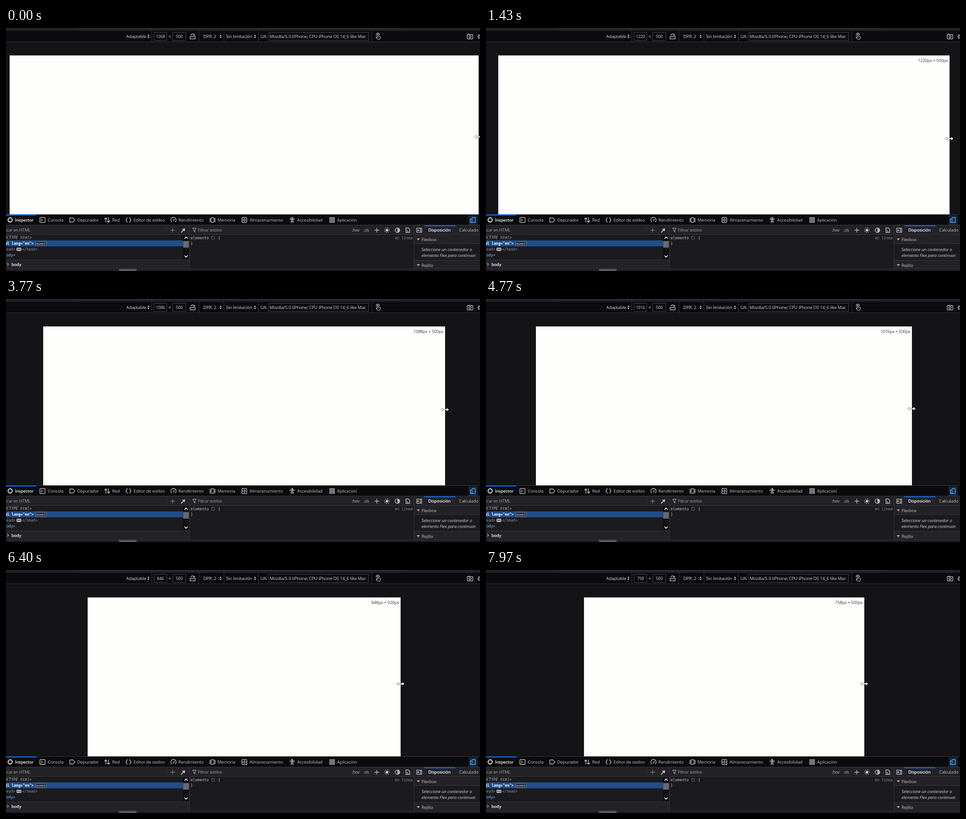
These frames come from a looping animation (1045x536 px, 8 s). An HTML page:

```html
<!DOCTYPE html>
<html lang="es">
<head>
<meta charset="utf-8">
<title>Vista adaptable</title>
<style>
  html, body { margin: 0; width: 100%; height: 100%; overflow: hidden; background: #141416; }
  svg { display: block; width: 1045px; height: 536px; }
  text { font: 9.7px "Open Sans", "Noto Sans", sans-serif; letter-spacing: -.2px; fill: #c0c0c4; white-space: pre; }
  .tool text { fill: #d6d6da; }
  .tabs text { font-weight: 500; }
  text.on { font-size: 9.3px; font-weight: 600; fill: #fff; }
  text.dim { font-size: 9.4px; fill: #a2a2a8; }
  text.it { font-style: italic; fill: #d0d0d4; }
  text.mono { font: 8.3px "DejaVu Sans Mono", "Noto Sans Mono", monospace; letter-spacing: 0; }
  text.bold { font-weight: 700; fill: #fff; }
  text.slant { font-style: italic; fill: #b0b0b5; }
  text.tag { fill: #75bfff; }
  text.gray { fill: #8f8f95; }
  text#label { font-size: 9.4px; letter-spacing: -.18px; fill: #3c3c40; }
  .end { text-anchor: end; }
  .mid { text-anchor: middle; }
  .rule { stroke: #36363c; fill: none; }
  .band { fill: #222227; }
  .box { fill: #0b0b0e; stroke: #45454c; }
  .ic { stroke: #bcbcc0; stroke-width: 1.4; fill: none; }
  .fill { fill: #bcbcc0; stroke: none; }
</style>
</head>
<body>
<svg viewBox="0 0 1045 536">
  <defs>
    <path id="spin" d="M-2.5-1 0-4 2.5-1zM-2.5 1 0 4 2.5 1z" fill="#c8c8cc"/>
    <path id="open" d="M-3.5-2h7L0 2.5z" fill="#a8a8ae"/>
  </defs>

  <!-- viewport -->
  <rect width="1045" height="536" fill="#141416"/>
  <rect id="page" y="60.5" height="351" fill="#fefefd"/>
  <text id="label" class="end" y="74.5"></text>
  <g id="cursor">
    <path d="M-9 0-4.5-3.5V-1H0V1H-4.5V3.5z" fill="#fff" stroke="#77777c" stroke-width=".8"/>
    <path d="M9 0 4.5-3.5V-1H0V1H4.5V3.5z" fill="#fff"/>
  </g>

  <!-- device toolbar -->
  <g class="tool">
    <rect width="1045" height="6" fill="#23222b"/>
    <path d="M154 .5H870" stroke="#3b3a45"/>
    <rect y="6" width="1045" height="24" fill="#0b0b0e"/>
    <path class="rule" d="M0 30.5H1045M321.5 6V30M425.5 6V30M480.5 6V30M556.5 6V30M806.5 6V30"/>
    <rect class="box" x="326.5" y="9.5" width="28" height="18"/>
    <rect class="box" x="367.5" y="9.5" width="29" height="18"/>
    <rect class="box" x="579.5" y="9.5" width="220" height="18"/>
    <text x="265" y="22">Adaptable</text>
    <use href="#spin" x="314" y="18.5"/>
    <text id="field" class="mid" x="340.5" y="22" style="font-size:9.2px"></text>
    <text class="mid" x="361" y="22">×</text>
    <text class="mid" x="382" y="22" style="font-size:9.2px">500</text>
    <g class="ic">
      <rect x="406" y="18.5" width="11" height="5.5"/>
      <path d="M408 16V14.5Q411.5 11.5 414.5 15"/>
      <path class="fill" d="M412.5 16.5H416.5V12.5z"/>
    </g>
    <text x="435" y="22">DPR: 2</text>
    <use href="#spin" x="473" y="18.5"/>
    <text x="485" y="22">Sin limitación</text>
    <use href="#spin" x="549" y="18.5"/>
    <text x="561" y="22">UA:</text>
    <text x="581.5" y="22">Mozilla/5.0 (iPhone; CPU iPhone OS 14_6 like Mac</text>
    <g class="ic" stroke-linejoin="round">
      <path d="M818.5 21V14.5a1.3 1.3 0 0 1 2.6 0V18l4.2 1v2.5q0 3.5-3.5 3.5h-1.5q-1.5 0-4.5-4.5 1-1.3 2.7.5z" stroke-width="1.2"/>
      <path d="M816.5 16.5a3.7 3.7 0 1 1 6.8-.5" stroke-width="1.1"/>
      <rect x="1016.7" y="14.5" width="12.5" height="9.5" rx="1.5"/>
      <circle cx="1023" cy="19.2" r="2.3"/>
      <path d="M1019 13.7H1022"/>
      <circle cx="1045" cy="19" r="3.3"/>
      <path d="M1039 19H1042M1041 14.5 1043 16.5M1041 23.5 1043 21.5"/>
    </g>
  </g>

  <!-- panel tabs -->
  <g class="tabs">
    <rect y="411" width="1045" height="24" fill="#0b0b0e"/>
    <path class="rule" d="M0 411.5H1045M0 434.5H1045"/>
    <rect y="411.3" width="67" height="2.4" fill="#0668ea"/>
    <rect x="1020" y="413" width="20" height="21" fill="#13263c"/>
    <g id="tabs"></g>
    <g class="ic">
      <g stroke="#fff">
        <rect x="5.2" y="419.2" width="8" height="8" rx="1.5"/>
        <path d="M9.2 417V419M9.2 427.5V430M3 423.2H5M13.5 423.2H15.5"/>
      </g>
      <rect x="74.7" y="418" width="11.5" height="11" rx="1.5"/>
      <path d="M77.5 421 80 423.5 77.5 426"/>
      <path d="M140.7 419H147.5L152 423.5 147.5 428H140.7z" stroke-linejoin="round"/>
      <path d="M220 429V419M217 422 220 418.5 223 422M226 418V428M223 425 226 428.5 229 425"/>
      <path d="M268 418.5Q266 418.5 266 420.5T264.5 423.5Q266 424 266 426T268 428.5M272 418.5Q274 418.5 274 420.5T275.5 423.5Q274 424 274 426T272 428.5"/>
      <path d="M365.5 428a5.8 5.8 0 1 1 7.5 0M368 426.5 372 421.5"/>
      <rect x="452" y="418.5" width="6.5" height="10" rx="1"/>
      <path d="M449.7 419V428.5M460.8 419V428.5"/>
      <rect x="520.2" y="418" width="10.5" height="11" rx="1.5"/>
      <path d="M520 423.5H531M524 421H527M524 426.5H527"/>
      <path d="M625.5 421.5H636.5M631 421.5V425M629.3 429.5V424.5M632.7 429.5V424.5" stroke-width="2"/>
      <circle class="fill" cx="631" cy="418.5" r="1.7"/>
      <g id="grid" stroke-width="1.1"></g>
      <g stroke="#58b0ff">
        <rect x="1027.5" y="418" width="7" height="11" rx="1"/>
        <path d="M1026 421H1024V429H1027.5"/>
      </g>
    </g>
  </g>

  <!-- markup pane -->
  <rect y="435" width="1045" height="101" fill="#1b1b1f"/>
  <rect class="band" y="435" width="1045" height="20"/>
  <text class="dim end" x="54" y="449">Buscar en HTML</text>
  <g class="ic">
    <path d="M367.5 441V451M362.5 446H372.5" stroke="#77777c"/>
    <path d="M386 451 391 446" stroke-width="1.8"/>
    <path d="M389.5 443 394 447.5M391.5 445.5 394.5 442.5" stroke-width="2.6"/>
  </g>
  <rect y="468.5" width="390" height="13" fill="#204e8a"/>
  <g class="end">
    <text class="mono slant" x="56.5" y="465">&lt;!DOCTYPE html&gt;</text>
    <text class="mono bold" x="61" y="478" style="font-size:8.1px">&lt;html lang="en"&gt;</text>
    <text class="mono gray" x="20.5" y="491">&lt;head&gt;</text>
    <text class="mono tag" x="20.5" y="504">&lt;body&gt;</text>
  </g>
  <rect x="65.5" y="470.5" width="24" height="9.5" rx="2" fill="#1c2b42" stroke="#8f9db3" stroke-width=".8"/>
  <text class="mono mid" x="77.5" y="478" style="font-size:7px;fill:#d7d7db">event</text>
  <rect x="23" y="484.5" width="11" height="7.5" rx="2" fill="#a8a8ad"/>
  <path d="M25 488.3H32" stroke="#222" stroke-width="1.5" stroke-dasharray="1.5 1.2"/>
  <text class="mono gray" x="35.5" y="491" style="font-size:8px">&lt;/head&gt;</text>
  <rect x="390" y="456" width="13.5" height="56" fill="#111114"/>
  <rect x="390.5" y="470" width="12.5" height="14.5" fill="#6a6a6e"/>
  <path d="M393.5 464.5 397 461 400.5 464.5M393.5 502 397 505.5 400.5 502" fill="none" stroke="#fff" stroke-width="1.7"/>
  <rect class="band" y="512" width="404" height="19"/>
  <path d="M2.5 518 5.5 521 2.5 524" fill="none" stroke="#b0b0b4" stroke-width="1.2"/>
  <text class="on" x="12" y="524.5">body</text>

  <!-- rules pane -->
  <path class="ic" d="M411.5 441.5H419.5L416.7 445.5V450L414.3 448.5V445.5z" style="stroke-width:1"/>
  <text class="dim" x="423" y="449">Filtrar estilos</text>
  <text x="762.5" y="449" style="font-size:9px">:hov</text>
  <text x="788" y="449" style="font-size:9px">.cls</text>
  <g class="ic">
    <path d="M817.5 441V451M812.5 446H822.5"/>
    <circle class="fill" cx="840" cy="446" r="3"/>
    <circle cx="840" cy="446" r="5" stroke-width="2" stroke-dasharray="1.3 2.627"/>
    <circle cx="863" cy="446" r="5"/>
    <path class="fill" d="M863 441a5 5 0 0 1 0 10z"/>
    <path d="M881.7 441H887L890 444V451H881.7z"/>
    <path d="M884.5 445V449H888" stroke-width="1.1"/>
  </g>
  <text class="mono" x="407" y="465.5">elemento</text>
  <rect x="453.5" y="460" width="6" height="6" fill="none" stroke="#a0a0a6" stroke-dasharray="1.5 1"/>
  <text class="mono" x="467.5" y="465.5">{</text>
  <text class="mono" x="407" y="478">}</text>
  <text class="mono gray end" x="896.5" y="465.5" style="font-size:8.1px">en línea</text>

  <!-- layout sidebar -->
  <rect x="922" y="435.3" width="69" height="2" fill="#0a74e8"/>
  <g class="ic" stroke-width="1.2">
    <rect x="905.5" y="441.5" width="11" height="9"/>
    <path d="M913.5 441.5V450.5"/>
    <path class="fill" d="M907.5 443.5 911.5 446 907.5 448.5z"/>
  </g>
  <text class="on" x="931" y="449">Disposición</text>
  <text x="999" y="449">Calculado</text>
  <rect class="band" x="900" y="456" width="145" height="20"/>
  <rect class="band" x="900" y="513" width="145" height="19"/>
  <use href="#open" x="909" y="466"/>
  <text x="916" y="470">Flexbox</text>
  <text class="it" x="916" y="491.5">Seleccione un contenedor o</text>
  <text class="it" x="916" y="504.5">elemento Flex para continuar.</text>
  <use href="#open" x="909" y="523"/>
  <text x="916" y="527">Rejilla</text>
  <path class="rule" d="M0 455.5H1045M0 511.5H404M354.5 438V453M404.5 435V531M899.5 435V531M900 475.5H1045M900 512.5H1045"/>

  <!-- bottom strip -->
  <rect y="531" width="1045" height="5" fill="#241a22"/>
  <path d="M0 531.5H1045" stroke="#33333b"/>
  <rect x="249" y="531.5" width="39" height="4.5" fill="#5a5a60"/>
</svg>
<script>
  const $ = id => document.getElementById(id);
  const STEP = 100 / 3, COUNT = 240;
  const MID = 524.8, SCALE = 0.8156, START = 15;

  // [step, viewport width, cursor height]
  const track = [
    [0, 1268, 240], [START, 1268, 242], [43, 1219.2, 244], [70, 1163.2, 245],
    [113, 1086.9, 244], [143, 1015.2, 242], [192, 846.9, 251],
    [225, 799, 251], [239, 757.2, 251], [240, 757.2, 251]
  ];

  const names = [
    [20, 'Inspector'], [92, 'Consola'], [157, 'Depurador'], [234, 'Red'],
    [281, 'Editor de estilos'], [380, 'Rendimiento'], [466, 'Memoria'],
    [537, 'Almacenamiento'], [642, 'Accesibilidad'], [730, 'Aplicación']
  ];
  $('tabs').innerHTML = names.map(([x, name], i) =>
    `<text x="${x}" y="427"${i ? '' : ' class="on"'}>${name}</text>`).join('');

  $('grid').innerHTML = Array.from({ length: 9 }, (_, i) =>
    `<rect x="${713.5 + i % 3 * 4.2}" y="${418 + Math.floor(i / 3) * 4.2}" width="2.4" height="2.4"/>`).join('');

  function at(step, col) {
    const i = Math.max(1, track.findIndex(k => k[0] >= step));
    const a = track[i - 1], b = track[i];
    const p = Math.max(0, (step - a[0]) / (b[0] - a[0]));
    return a[col] + (b[col] - a[col]) * p;
  }

  const even = v => 2 * Math.round(v / 2);

  function draw(ms) {
    const step = Math.floor((ms + 5) / STEP) % COUNT;
    const w = even(at(step, 1));
    const left = Math.round(MID - w * SCALE / 2), right = Math.round(MID + w * SCALE / 2);
    $('page').setAttribute('x', left);
    $('page').setAttribute('width', right - left);
    $('field').textContent = w;
    // the size label trails the field slightly
    $('label').textContent = step > START ? `${even(at(step - 0.36, 1))}px × 500px` : '';
    $('label').setAttribute('x', right - 3.5);
    $('cursor').setAttribute('transform', `translate(${right - 0.8} ${Math.round(at(step, 2))})`);
  }

  const begin = performance.now();
  function tick() {
    draw(performance.now() - begin);
    requestAnimationFrame(tick);
  }
  tick();
</script>
</body>
</html>
```
